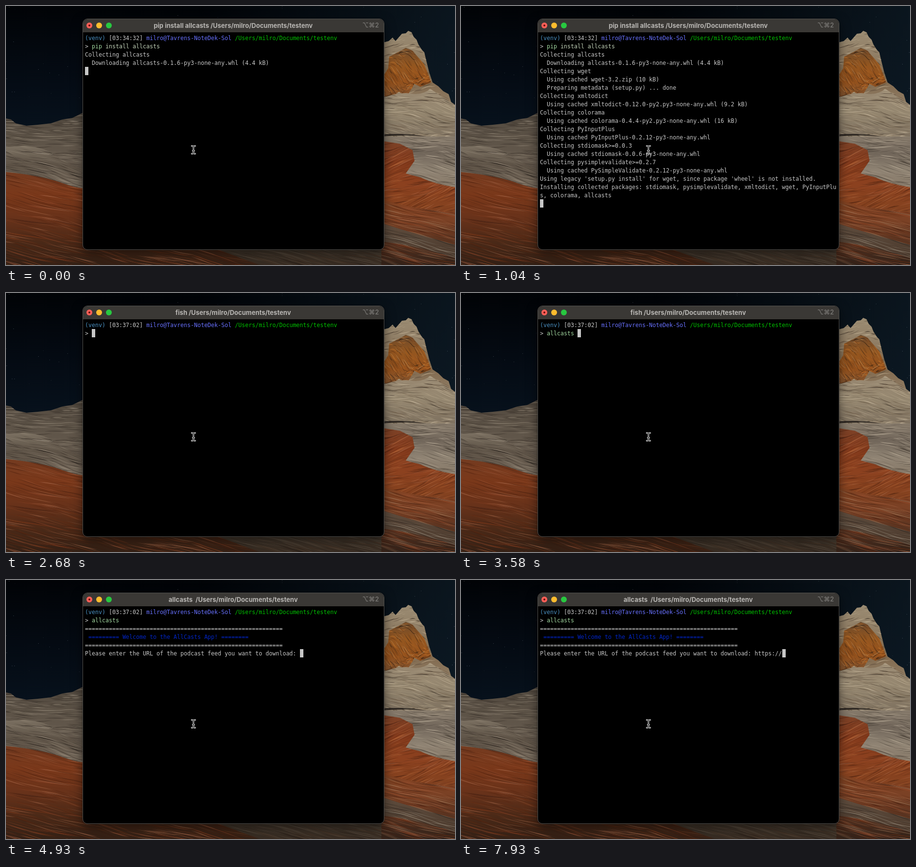
An HTML page with a canvas for the animation above (8000 ms loop, 921x532 px).

```html
<!DOCTYPE html>
<html lang="en">
<head>
<meta charset="utf-8">
<title>Terminal session</title>
<style>
html, body { margin: 0; width: 100%; height: 100%; overflow: hidden; background: #04080e; }
#stage { position: relative; width: 921px; height: 532px; overflow: hidden; }
#stage > * { position: absolute; }
#land { left: 0; top: 0; }
#win { left: 157px; top: 26px; width: 617px; height: 473px; border: 1px solid #55534f;
  border-radius: 10px; background: #000; overflow: hidden; }
#shade { left: 157px; top: 26px; width: 619px; height: 475px; border-radius: 10px;
  box-shadow: 0 8px 22px rgba(0,0,0,.5), 0 0 2px rgba(0,0,0,.8); }
#bar { height: 27px; background: #3a3835; }
#title { left: 157px; width: 618px; top: 30px; height: 20px; text-align: center; white-space: pre;
  font: 700 13px/20px Inter, "Liberation Sans", sans-serif; color: #b8b6b3; }
#keys { right: 156px; top: 29px; font: 500 13px/20px Inter, "DejaVu Sans", sans-serif; color: #7d7b78; }
.dot { width: 12px; height: 12px; top: 34px; border-radius: 50%; }
#text, #cursor { margin: 0; font: 11.627px/17px "DejaVu Sans Mono", "Liberation Mono", monospace; white-space: pre; }
#text { left: 162px; top: 58px; color: #c7c7c7; }
#cursor { width: 7px; height: 17px; background: #c7c7c7; color: #000; overflow: hidden; }
.env { color: #4b92c4; } .user { color: #6871ff; } .path { color: #00c200; }
.cmd { color: #a2d8a0; } .arg { color: #c3d3b9; } .bad { color: #ff6e67; }
.hint { color: #686868; } .blue { color: #0225c7; }
</style>
</head>
<body>
<div id="stage">
  <canvas id="land" width="921" height="532"></canvas>
  <div id="shade"></div>
  <div id="win"><div id="bar"></div></div>
  <div class="dot" style="left:165px;background:radial-gradient(circle,#6b0f0c 1.5px,#ff5f57 2.3px)"></div>
  <div class="dot" style="left:185px;background:#febc2e"></div>
  <div class="dot" style="left:205px;background:#28c840"></div>
  <div id="title"></div>
  <div id="keys">⌥⌘2</div>
  <pre id="text"></pre>
  <div id="cursor"></div>
  <svg style="left:378px;top:284px" width="14" height="23" fill="none" stroke-linecap="round">
    <defs><path id="beam" d="M3 3.5Q6 3.5 6.5 6Q7 3.5 10 3.5M6.5 6V17M3 19.5Q6 19.5 6.5 17Q7 19.5 10 19.5M5 13.5H8"/></defs>
    <use href="#beam" stroke="#fff" stroke-width="2.8"/>
    <use href="#beam" stroke="#000" stroke-width="1.1"/>
  </svg>
</div>
<script>
const $ = id => document.getElementById(id);

// ---------- desert backdrop ----------
const g = $('land').getContext('2d');
let seed = 11;
const rnd = () => (seed = (seed * 16807) % 2147483647) / 2147483647;
const pick = list => list[Math.floor(rnd() * list.length)];

function fade(y0, y1, ...colors) {
  const f = g.createLinearGradient(0, y0, 0, y1);
  colors.forEach((c, i) => f.addColorStop(i / (colors.length - 1), c));
  return f;
}

// Fills a shape, then lays tapered strata over it that follow a shared wavy slope.
function rock(d, fill, [x0, y0, x1, y1], { n, len, tilt, wave = .08, wide = 1.3, colors }) {
  const shape = new Path2D(d);
  g.save();
  g.fillStyle = fill;
  g.fill(shape);
  g.clip(shape);
  for (let i = 0; i < n; i++) {
    const x = x0 - len / 2 + rnd() * (x1 - x0 + len / 2), y = y0 + rnd() * (y1 - y0);
    const dx = len * (.3 + rnd()), w = wide * (.4 + rnd());
    const dy = dx * (tilt + wave * Math.sin(x / 31 + y / 19) + (rnd() - .5) * wave);
    const mx = x + dx / 2, my = y + dy / 2 + dx * wave * (rnd() - .5);
    g.globalAlpha = .25 + rnd() * .45;
    g.fillStyle = pick(colors);
    g.beginPath();
    g.moveTo(x, y);
    g.quadraticCurveTo(mx, my - w, x + dx, y + dy);
    g.quadraticCurveTo(mx, my + w, x, y);
    g.fill();
  }
  g.restore();
}

function drawLand() {
  g.fillStyle = fade(0, 250, '#010306', '#040a12', '#07111c');
  g.fillRect(0, 0, 921, 532);
  const right = g.createLinearGradient(400, 0, 921, 0);
  right.addColorStop(0, 'rgba(13,26,36,0)');
  right.addColorStop(1, 'rgba(13,26,36,.8)');
  g.fillStyle = right;
  g.fillRect(400, 0, 521, 240);
  for (let i = 0; i < 85; i++) {
    g.fillStyle = `rgba(190,205,220,${.08 + rnd() * .3})`;
    g.fillRect(Math.floor(rnd() * 921), Math.floor(rnd() * 225), 1, 1);
  }

  const grey = ['#3b332b', '#241e19', '#8d8272', '#a99d8b', '#6d6255'];
  const cream = ['#c4b497', '#b3a386', '#5a4937', '#352a20', '#8b7a63', '#d0c1a6'];
  const rust = ['#3b1b0f', '#592611', '#93492a', '#a8694a', '#6b2f13'];
  const amber = ['#3c2413', '#6b3714', '#c4752c', '#a85a20', '#24180f', '#b08a5e'];

  // left ridge, pale shelf and red slope
  rock('M0 231L10 233L20 241L42 246L65 244L92 241L116 233L136 230L160 218V390H0Z',
    fade(220, 380, '#51483e', '#5d5347', '#655a4e', '#63574b'), [0, 222, 160, 380],
    { n: 420, len: 55, tilt: .05, colors: grey });
  rock('M0 290Q60 281 95 303T160 338V376Q100 352 0 345Z',
    fade(285, 370, '#7d7263', '#5c5145', '#786b5d'), [0, 285, 160, 375],
    { n: 240, len: 60, tilt: .26, wave: .14, colors: grey });
  rock('M0 341Q70 348 110 362T160 374L500 470L921 480V532H0Z',
    fade(340, 532, '#743b20', '#7a381a', '#68321a', '#4b2917', '#332015'), [0, 340, 500, 532],
    { n: 800, len: 85, tilt: .24, wave: .1, colors: rust });
  rock('M380 480L800 480V532H520Z', fade(498, 532, '#41362b', '#352a21'), [380, 495, 800, 532],
    { n: 200, len: 75, tilt: .26, colors: ['#241c16', '#54483b', '#66584a', '#4a3526'] });

  // right peak
  rock('M770 76L785 72L793 65L799 72L806 64L812 57L820 56L825 51L832 54L836 63L842 69L846 79L853 90L858 95L862 112L868 136L875 157L887 165L897 175L908 181L913 197L921 203V350H770Z',
    fade(50, 345, '#9b8c73', '#917f66', '#80684c', '#8d7a62', '#988972', '#857866', '#807262'), [770, 50, 921, 345],
    { n: 650, len: 22, tilt: .12, wave: .4, wide: 1.6, colors: cream });
  rock('M786 104L806 94L820 86L834 92L846 106L858 120L866 140L872 157L850 166L838 160L822 186L806 176L790 188L770 184V150L784 128Z',
    fade(88, 190, '#6d4a2b', '#94561f', '#95521d', '#7d5433'), [770, 86, 872, 190],
    { n: 330, len: 15, tilt: .5, wave: 1.1, wide: 1.8, colors: amber });
  rock('M770 190Q805 176 830 180T870 170L921 204V268Q850 258 770 268Z',
    fade(170, 268, '#9c8c75', '#94866f', '#7d705f'), [770, 170, 921, 268],
    { n: 300, len: 42, tilt: .2, wave: .22, colors: cream });
  rock('M770 264Q820 260 862 268Q820 264 770 268Z', '#2d2722', [770, 262, 862, 269],
    { n: 6, len: 40, tilt: .03, colors: grey });

  // red fan below the shelf, with pale rock beside it
  rock('M770 276H921V455L770 450Z',
    fade(276, 455, '#7d4328', '#82391b', '#8c411f', '#85421f', '#6b3c24'), [770, 276, 921, 455],
    { n: 480, len: 55, tilt: -.3, wave: .22, colors: [...rust, '#b5683a'] });
  rock('M770 268H921V372Q880 366 850 352L820 344L838 318L834 296L808 283L770 277Z',
    fade(270, 370, '#85796a', '#71665a', '#8f8373', '#8a7c6b'), [770, 268, 921, 372],
    { n: 260, len: 45, tilt: .18, wave: .2, colors: [...grey, '#bfb29d'] });
  rock('M770 398Q840 418 921 424V532H770Z',
    fade(398, 532, '#824322', '#7a4125', '#553220', '#2f2018'), [770, 398, 921, 532],
    { n: 330, len: 75, tilt: .24, colors: [...rust, '#a98364'] });
  rock('M770 446Q845 470 921 490V518Q845 492 770 484Z',
    fade(446, 518, '#5f4d3e', '#4a382b'), [770, 446, 921, 518],
    { n: 120, len: 70, tilt: .27, colors: grey });
}
drawLand();

// ---------- terminal ----------
const user = 'milro', host = 'Tavrens-NoteDek-Sol';
const path = `/Users/${user}/Documents/testenv`;
const s = (cls, text) => `<span class="${cls}">${text}</span>`;
const prompt = time =>
  `${s('env', '(venv)')} [${time}] ${s('user', `${user}@${host}`)} ${s('path', path)}`;

const install = [
  prompt('03:34:32'),
  `&gt; ${s('cmd', 'pip')} ${s('arg', 'install allcasts')}`,
  'Collecting allcasts',
  '  Downloading allcasts-0.1.6-py3-none-any.whl (4.4 kB)',
  'Collecting wget',
  '  Using cached wget-3.2.zip (10 kB)',
  '  Preparing metadata (setup.py) ... done',
  'Collecting xmltodict',
  '  Using cached xmltodict-0.12.0-py2.py3-none-any.whl (9.2 kB)',
  'Collecting colorama',
  '  Using cached colorama-0.4.4-py2.py3-none-any.whl (16 kB)',
  'Collecting PyInputPlus',
  '  Using cached PyInputPlus-0.2.12-py3-none-any.whl',
  'Collecting stdiomask&gt;=0.0.3',
  '  Using cached stdiomask-0.0.6-py3-none-any.whl',
  'Collecting pysimplevalidate&gt;=0.2.7',
  '  Using cached PySimpleValidate-0.2.12-py3-none-any.whl',
  "Using legacy 'setup.py install' for wget, since package 'wheel' is not installed.",
  'Installing collected packages: stdiomask, pysimplevalidate, xmltodict, wget, PyInputPlu',
  's, colorama, allcasts',
  '    Running setup.py install for wget ... done',
  'Successfully installed PyInputPlus-0.2.12 allcasts-0.1.6 colorama-0.4.4 pysimplevalidat',
  'e-0.2.12 stdiomask-0.0.6 wget-3.2 xmltodict-0.12.0',
  prompt('03:37:00'),
  '&gt; '
];
const rule = '='.repeat(58);
const titles = {
  pip: `pip install allcasts ${path}`,
  fish: `fish ${path}`,
  app: `allcasts  ${path}`
};

// Each view: title, lines, cursor row and column (row -1 hides it), letter under the cursor.
const view = (title, lines, row, col = 0, under = '') => ({ title: titles[title], lines, row, col, under });
const log = (n, row = n) => view('pip', install.slice(0, n), row);
const shell = (cmd, col, under) => view('fish', [prompt('03:37:02'), '&gt; ' + cmd], 1, col, under);
const guess = n => shell(s('bad', 'allcasts'.slice(0, n)) + s('hint', 'allcasts'.slice(n)), 2 + n, 'allcasts'[n]);
const started = [prompt('03:37:02'), '&gt; ' + s('cmd', 'allcasts')];
const ask = typed => view('app', [...started, rule,
  s('blue', ` ${'='.repeat(9)} Welcome to the AllCasts App! ${'='.repeat(8)}`), rule,
  'Please enter the URL of the podcast feed you want to download: ' + typed], 5, 63 + typed.length);

const steps = [
  [0, log(4)], [150, log(7, -1)], [300, log(11)], [590, log(13)], [740, log(15)],
  [1040, log(20)], [1190, log(23)], [1330, view('fish', install, 24, 2)],
  [2680, shell('', 2)], [2830, guess(1)], [2980, guess(2)], [3130, guess(3)],
  [3580, shell(s('cmd', 'allcasts'), 11)],
  [4480, view('fish', started, 2)], [4630, view('app', started, 2)],
  [4930, ask('')], [6730, ask('h')], [6880, ask('ht')], [7030, ask('http')],
  [7330, ask('https')], [7630, ask('https:')], [7780, ask('https:/')], [7930, ask('https://')]
];

let shown = null;
function show(v) {
  if (v === shown) return;
  shown = v;
  $('title').textContent = v.title;
  $('text').innerHTML = v.lines.join('\n');
  const c = $('cursor');
  c.style.display = v.row < 0 ? 'none' : 'block';
  c.style.left = 162 + 7 * v.col + 'px';
  c.style.top = 57 + 17 * v.row + 'px';
  c.textContent = v.under;
}

const start = performance.now();
function tick() {
  const t = (performance.now() - start) % 8000;
  show(steps.filter(step => step[0] <= t).pop()[1]);
  requestAnimationFrame(tick);
}
tick();
</script>
</body>
</html>
```
